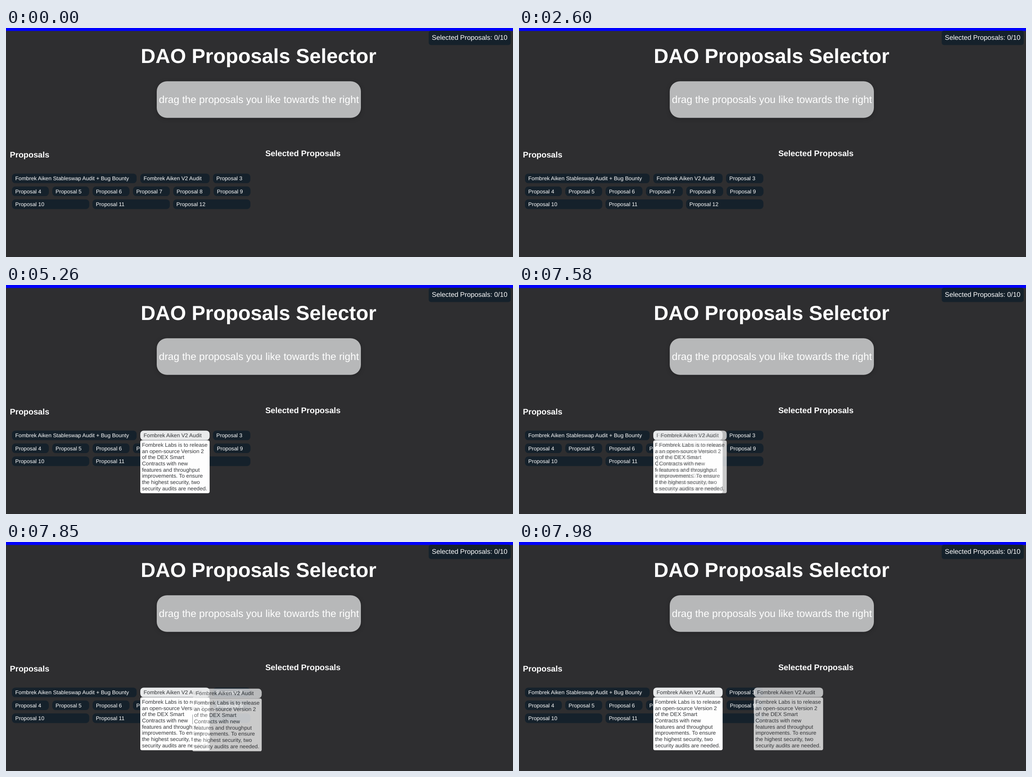
An HTML page that plays this animation: 1110x504 px, repeating every 8000 ms.

```html
<!DOCTYPE html>
<html lang="en">
<head>
<meta charset="utf-8">
<title>DAO Proposals Selector</title>
<style>
html, body { margin: 0; width: 100%; height: 100%; overflow: hidden; background: #2e2e30; }
svg { display: block; width: 1110px; height: 504px; }
text { font-family: "Liberation Sans", Arial, sans-serif; fill: #fff; text-rendering: geometricPrecision; }
.bold { font-weight: bold; }
.dark text { fill: #333538; }
#hint rect { filter: drop-shadow(0 2px 5px rgba(0, 0, 0, .22)); }
</style>
</head>
<body>
<svg id="stage" viewBox="0 0 1110 504"></svg>
<script>
const LOOP = 8000;
const NAVY = '#15212b', LIGHT = '#e9eaeb';
const SMALL = 11.9, LINE = 13.65;
const stage = document.getElementById('stage');

function add(parent, tag, attrs) {
  const el = document.createElementNS('http://www.w3.org/2000/svg', tag);
  for (const k in attrs) el.setAttribute(k, attrs[k]);
  return parent.appendChild(el);
}
const group = attrs => add(stage, 'g', attrs);
const box = (g, x, y, width, height, rx, fill) =>
  add(g, 'rect', { x, y, width, height, rx, fill });
function label(g, x, y, size, text, attrs) {
  add(g, 'text', { x, y, 'font-size': size, ...attrs }).textContent = text;
}

const page = group({});
box(page, 0, 0, 1110, 6.5, 0, '#0000ff');
box(page, 925.5, 6, 179.5, 31.5, 5, NAVY);
label(page, 932.3, 26, 14.88, 'Selected Proposals: 0/10');
label(page, 295, 77, 44.64, 'DAO Proposals Selector', { class: 'bold' });
label(page, 8.6, 285, 17.86, 'Proposals', { class: 'bold' });
label(page, 567.7, 282, 17.86, 'Selected Proposals', { class: 'bold' });

const hint = group({ id: 'hint' });
box(hint, 330, 117.3, 447, 80.4, 22.3, '#b7b8b9');
label(hint, 553.7, 165, 22.32, 'drag the proposals you like towards the right', { 'text-anchor': 'middle' });

function chip(g, [x, right, name], row, fill) {
  const y = 320.4 + row * 28.4;
  box(g, x, y, right - x, 21.2, 7.5, fill);
  label(g, x + 7.3, Math.round(y + 14.8), SMALL, name);
}

const audit = [13, 286, 'Fombrek Aiken Stableswap Audit + Bug Bounty'];
const v2 = [294, 445.8, 'Fombrek Aiken V2 Audit'];
const rows = [
  [audit, v2, [453.2, 535, 'Proposal 3']],
  [4, 5, 6, 7, 8, 9].map((n, i) => [13 + i * 88.3, 93.8 + i * 88.3, 'Proposal ' + n]),
  [10, 11, 12].map((n, i) => [13 + i * 176.4, 182.3 + i * 176.4, 'Proposal ' + n])
];
rows.forEach((row, i) => row.forEach(c => chip(page, c, i, NAVY)));

// Highlighted chip with its description below
function card(item, lines) {
  const g = group({ class: 'dark' });
  const [x, right] = item;
  chip(g, item, 0, LIGHT);
  box(g, x, 342, right - x, lines.length * LINE + 7.1, 3.7, '#fefefe');
  lines.forEach((s, i) => label(g, x + 3.7, Math.round(356 + i * LINE), SMALL, s));
  return g;
}
const v2Lines = [
  'Fombrek Labs is to release', 'an open-source Version 2', 'of the DEX Smart',
  'Contracts with new', 'features and throughput', 'improvements. To ensure',
  'the highest security, two', 'security audits are needed.'
];
const first = card(audit, [
  'The problem to be solved is the current lack of an',
  'open-source Stableswap on Cardano and the low',
  'liquidity for stable assets (in particular stablecoins)',
  'in the DeFi ecosystem.'
]);
const second = card(v2, v2Lines);
const ghost = card(v2, v2Lines);
ghost.setAttribute('opacity', .75);
box(ghost, 294, 377.5, 1, 21, 0, 'rgba(21, 33, 43, .6)');

// time, dx, dy of the dragged copy
const drag = [
  [7580, 9, 0], [7650, 26, 0], [7720, 50, 1], [7780, 80, 2],
  [7850, 114, 2.3], [7910, 167, 1], [7980, 220, 0]
];
const show = (el, on) => el.setAttribute('visibility', on ? 'visible' : 'hidden');

function draw() {
  const t = performance.now() % LOOP;
  const lift = t >= 1130 && t < 2600 ? -3 : 0;
  hint.setAttribute('transform', `translate(0 ${lift})`);
  show(first, t >= 3660 && t < 5260);
  show(second, t >= 5260);
  const step = drag.filter(d => d[0] <= t).pop();
  show(ghost, !!step);
  if (step) ghost.setAttribute('transform', `translate(${step[1]} ${step[2]})`);
  requestAnimationFrame(draw);
}
draw();
</script>
</body>
</html>
```
